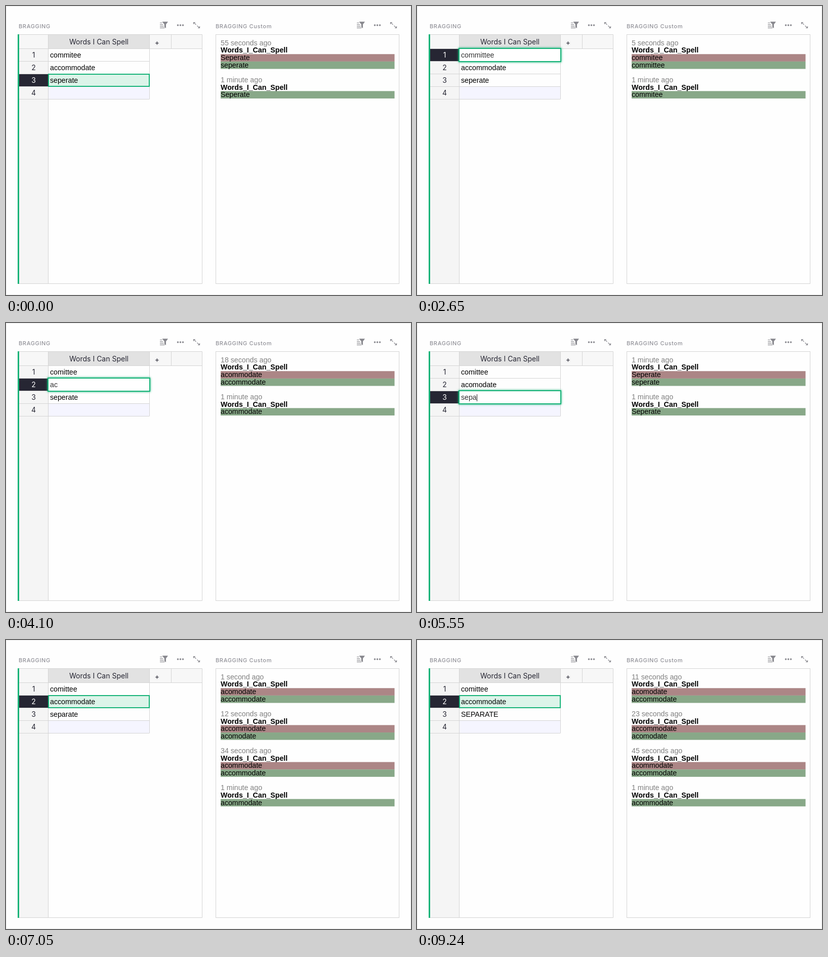
Recreate the animation shown at these times as an HTML page. Size 800 px wide and 572 px high, loop 9330 ms.

```html
<!DOCTYPE html>
<html lang="en">
<head>
<meta charset="utf-8">
<title>Words I Can Spell</title>
<style>
html, body { margin: 0; width: 100%; height: 100%; overflow: hidden; background: #fefefe; }
svg { display: block; width: 800px; height: 572px; }
.ui { font: 14px Inter, sans-serif; fill: #262633; text-anchor: middle; }
.title { font: 500 11px Inter, sans-serif; letter-spacing: .65px; fill: #929299; }
.cell { font: 14.2px "Liberation Sans", Arial, sans-serif; fill: #000; }
.typed { fill: #333; }
.ago { fill: #808080; }
.bold { font-weight: bold; }
.line { stroke: #d4d4d4; fill: none; }
.icon { fill: #8a8a90; stroke: none; }
.icon path.s { fill: none; stroke: #8a8a90; stroke-width: 1.2; }
.glow { filter: drop-shadow(0 0 2px #16b378); }
</style>
</head>
<body>
<svg viewBox="0 0 800 572">
  <defs>
    <g id="tools" class="icon">
      <path class="s" d="M304 33.5h4.5M304 36.8h6M304 40.1h7.5M304 43.4h9.5"/>
      <path d="M308.5 31H320L316 36.5V44L312.8 41.5V36.5Z"/>
      <circle cx="339.5" cy="38" r="1.8"/><circle cx="344.5" cy="38" r="1.8"/><circle cx="349.5" cy="38" r="1.8"/>
      <path class="s" d="M370.5 36V32.5H374M370.5 32.5L375.5 37M382.5 40V43.5H379M382.5 43.5L377.5 39"/>
    </g>
  </defs>
  <rect x=".5" y=".5" width="799" height="571" fill="#fefefe" stroke="#ececec"/>
  <text class="title" x="25" y="43.5">BRAGGING</text>
  <text class="title" x="414" y="43.5">BRAGGING Custom</text>
  <use href="#tools"/><use href="#tools" x="389"/>
  <rect x="26" y="57" width="361" height="27" fill="#f7f7f7"/>
  <rect x="26" y="84" width="57" height="465" fill="#f5f5f5"/>
  <rect x="84" y="57" width="199" height="27" fill="#e2e2e2"/>
  <rect x="84" y="160" width="199" height="24" fill="#f5f5ff"/>
  <path class="line" d="M26 56.5H387.5V549.5H26M83.5 57V549M283.5 57V184.5M326.5 57V84M26 84.5H387M26 109.5H283M26 134.5H283M26 159.5H283M26 184.5H283"/>
  <rect x="23" y="56" width="3" height="494" fill="#16b378"/>
  <rect class="line" x="414.5" y="56.5" width="362" height="493"/>
  <text class="ui" x="183.5" y="76">Words I Can Spell</text>
  <text class="ui" x="298.5" y="76.5">+</text>
  <g id="grid"></g>
  <g id="log"></g>
</svg>
<script>
const LOOP = 9330;
const grid = document.getElementById('grid');
const log = document.getElementById('log');

// Each row's edits: [time, before, after], oldest first.
const edits = {
  1: [[-13000, '', 'commitee']],
  2: [[-13000, '', 'acommodate'], [100, 'acommodate', 'accommodate']],
  3: [[-13000, '', 'Seperate'], [-11000, 'Seperate', 'seperate']],
  4: []
};
const words = { 1: 'commitee', 2: 'accommodate', 3: 'seperate', 4: '' };
const states = [];
let row = 3, shown = [];

function ago(time, now) {
  const s = Math.max(1, Math.floor((now - time) / 200));
  if (s >= 60) return '1 minute ago';
  return s + (s === 1 ? ' second ago' : ' seconds ago');
}

function push(t, typed) {
  states.push({ t, row, typed, words: { ...words }, shown });
}

function select(t, r) {
  row = r;
  // the blank row leaves the last history in view
  if (r < 4) shown = edits[r].map(([at, from, to]) => ({ label: ago(at, t), from, to })).reverse();
  push(t, null);
}

function type(t, word, from = 1, step = 50) {
  for (let n = from; n <= word.length; n++, t += step) push(t, word.slice(0, n) + '|');
}

function enter(t, word) {
  if (word !== words[row]) edits[row].push([t, words[row], word]);
  words[row] = word;
  select(t, row + 1);
}

select(0, 3);
select(50, 2);
select(100, 1);
type(150, 'committee', 1, 70);
enter(800, 'committee');
select(1000, 1);
type(1050, 'committe');
push(1500, 'committee|');
enter(1600, 'committee');
select(1850, 1);
type(1950, 'committee', 1, 75);
push(2650, 'committee');
push(2700, 'committee|');
enter(2800, 'committee');
select(2900, 1);
type(2950, 'comittee');
enter(3400, 'comittee');
select(3600, 1);
select(3850, 2);
type(3900, 'ac', 1, 100);
push(4100, 'ac');
push(4150, 'aco|');
type(4300, 'acomodate', 4);
enter(4600, 'acomodate');
type(4750, 'seper', 1, 100);
push(5250, 'seper');
push(5300, 'seper|');
push(5450, 'sepe|');
push(5500, 'sep|');
type(5550, 'separate', 4);
enter(5800, 'separate');
select(5950, 3);
select(6250, 2);
type(6400, 'accommodate');
enter(6950, 'accommodate');
select(7050, 2);
select(7300, 3);
type(7650, 'SP', 1, 100);
push(7800, 'SP');
push(7950, 'SP|');
type(8000, 'SPEARATE', 3);
enter(8300, 'SPEARATE');
select(8400, 3);
type(8450, 'SEPARATE');
enter(8900, 'SEPARATE');
select(9000, 3);
select(9240, 2);

function add(parent, tag, attrs, text) {
  const el = document.createElementNS('http://www.w3.org/2000/svg', tag);
  for (const k in attrs) el.setAttribute(k, attrs[k]);
  if (text) el.textContent = text;
  return parent.appendChild(el);
}

function box(parent, x, y, width, height, fill, more) {
  return add(parent, 'rect', { x, y, width, height, fill, ...more });
}

function drawGrid(s) {
  grid.replaceChildren();
  const border = { stroke: '#16b378', 'stroke-width': 2 };
  const top = 84 + 25 * (s.row - 1);
  const editing = s.typed !== null;
  box(grid, 26, top + 1, 57, 24, '#262633');
  if (editing) box(grid, 83, top, 201, 26, '#fff', { ...border, class: 'glow' });
  else box(grid, 84, top + 1, 199, 24, '#dcf4e9', border);
  for (let r = 1; r <= 4; r++) {
    const y = 77 + 25 * r;
    const on = r === s.row;
    add(grid, 'text', { class: 'ui', x: 54.5, y: y - .5, style: on ? 'fill:#fff' : '' }, String(r));
    const typing = on && editing;
    const word = typing ? s.typed.replace('|', '') : s.words[r];
    const el = add(grid, 'text', { class: typing ? 'cell typed' : 'cell', x: 87, y }, word);
    if (typing && s.typed.endsWith('|')) {
      box(grid, Math.round(87 + el.getComputedTextLength()), y - 11, 1, 14, '#222');
    }
  }
}

function drawLog(s) {
  log.replaceChildren();
  const h = 14.63;
  s.shown.forEach((e, i) => {
    const y = 66 + i * 5 * h;
    let n = 0;
    const put = (text, cls, fill) => {
      const at = y + h * n++;
      if (fill) box(log, 424, at, 343.5, h, fill);
      add(log, 'text', { class: 'cell ' + cls, x: 424, y: at + 11.8 }, text);
    };
    put(e.label, 'ago');
    put('Words_I_Can_Spell', 'bold');
    if (e.from) put(e.from, '', '#ac8686');
    put(e.to, '', '#88a888');
  });
}

let current, start;
function frame(now) {
  start ??= now;
  const t = (now - start) % LOOP;
  const s = states.findLast(x => x.t <= t);
  if (s !== current) {
    drawGrid(s);
    if (!current || s.shown !== current.shown) drawLog(s);
    current = s;
  }
  requestAnimationFrame(frame);
}
requestAnimationFrame(frame);
</script>
</body>
</html>
```
